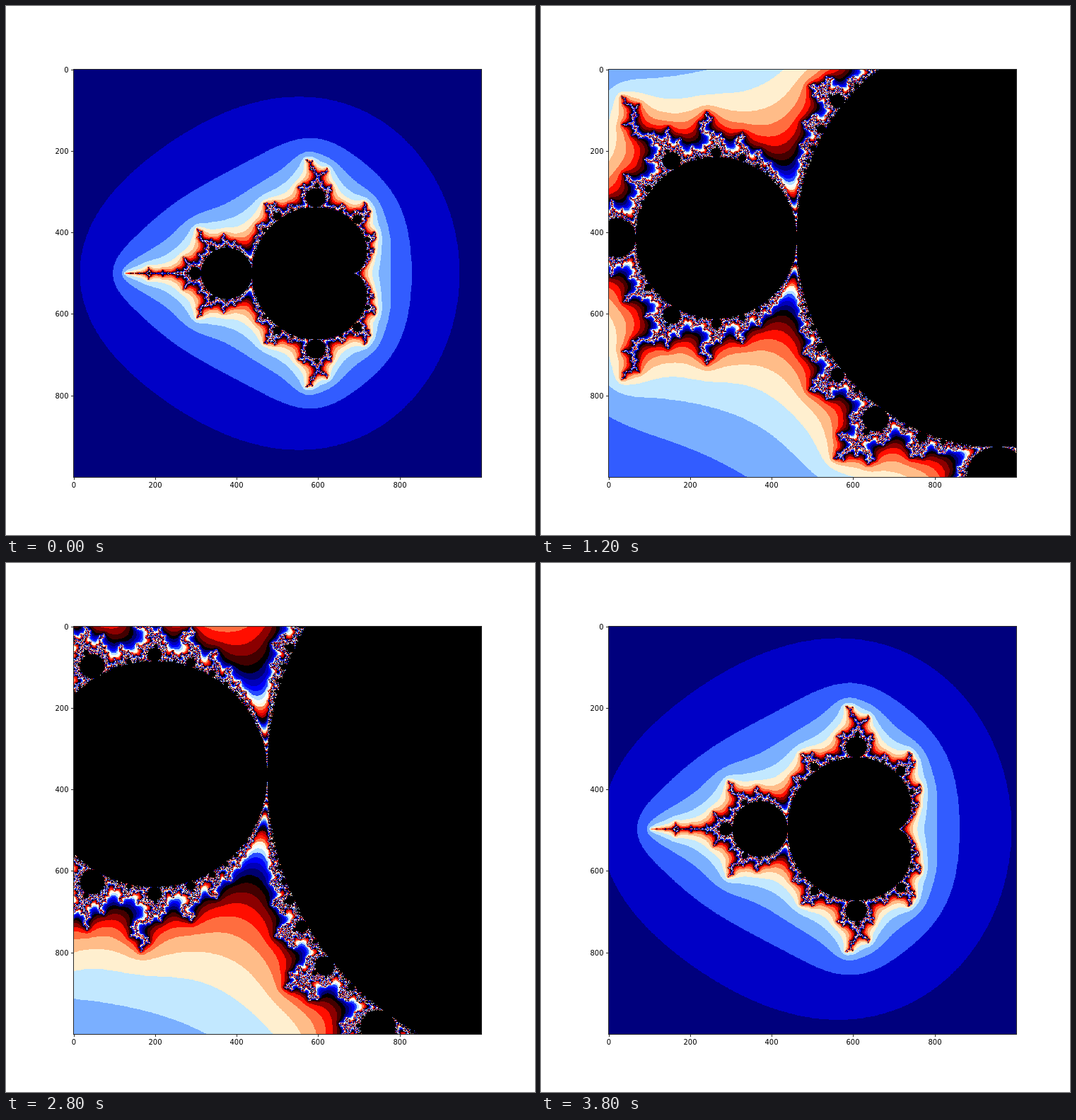
Recreate the animation shown at these times as an HTML page with a canvas. Size 748x748 px, loop 4 s.

```html
<!DOCTYPE html>
<html lang="en">
<head>
<meta charset="utf-8">
<title>Fractal zoom</title>
<style>
  html, body { margin: 0; width: 100%; height: 100%; overflow: hidden; background: #fff; }
  canvas { display: block; }
</style>
</head>
<body>
<canvas id="stage" width="748" height="748"></canvas>
<script>
const ctx = document.getElementById('stage').getContext('2d');

const LEFT = 96, TOP = 90, SIZE = 576;
const GRID = 1000, SCALE = SIZE / GRID;
const STEP = 200, FRAMES = 20, DEEPEST = 10;
const MAX_ITER = 200, BAILOUT = 100;
const TARGET = { re: -0.793191078177363, im: 0.16093721735804 };
const START = { re: -2.5, im: -2, span: 4 };

// Cyclic palette: black, blue, white, red.
const channel = v => Math.floor(255 * Math.min(1, Math.max(0, v)));

function colorAt(i) {
  const a = 31.5 * Math.PI * (255 - i) / 255;
  const r = channel(0.75 * Math.sin(a + Math.PI / 4) + 0.5);
  const g = channel(Math.sin(a));
  const b = channel(0.75 * Math.sin(a - Math.PI / 4) + 0.5);
  return [r, g, b];
}

const palette = Array.from({ length: MAX_ITER }, (_, n) =>
  colorAt(Math.min(255, Math.floor(n * 256 / (MAX_ITER - 1)))));

function insideMainBulbs(x, y) {
  const y2 = y * y, d = x - 0.25, q = d * d + y2;
  return q * (q + d) < 0.25 * y2 || (x + 1) * (x + 1) + y2 < 0.0625;
}

// Escape step, or 0 for points that stay bounded.
function escapeStep(x, y) {
  if (insideMainBulbs(x, y)) return 0;
  let a = 0, b = 0, a2 = 0, b2 = 0;
  for (let n = 0; n < MAX_ITER; n++) {
    b = 2 * a * b + y;
    a = a2 - b2 + x;
    a2 = a * a;
    b2 = b * b;
    if (a2 + b2 > BAILOUT) return n;
  }
  return 0;
}

// Plane coordinate of every screen pixel along one axis.
function axisValues(start, target, zoom) {
  const first = target + (start - target) / zoom;
  const step = START.span / zoom / (GRID - 1);
  return Float64Array.from({ length: SIZE }, (_, p) =>
    first + step * Math.floor((p + 0.5) / SCALE));
}

function render(level) {
  const zoom = 1 + level ** 3 / 100;
  const xs = axisValues(START.re, TARGET.re, zoom);
  const ys = axisValues(START.im, TARGET.im, zoom);
  const image = ctx.createImageData(SIZE, SIZE);
  const data = image.data;
  let o = 0;
  for (const y of ys) {
    for (const x of xs) {
      const c = palette[escapeStep(x, y)];
      data[o++] = c[0];
      data[o++] = c[1];
      data[o++] = c[2];
      data[o++] = 255;
    }
  }
  return image;
}

function drawAxes() {
  ctx.fillStyle = '#fff';
  ctx.fillRect(0, 0, 748, 748);

  ctx.fillStyle = 'rgb(40,40,40)';
  ctx.fillRect(LEFT - 1, TOP - 1, SIZE + 2, SIZE + 2);

  ctx.font = '10px "DejaVu Sans", sans-serif';
  ctx.textBaseline = 'alphabetic';
  for (let v = 0; v < GRID; v += 200) {
    const offset = Math.floor((v + 0.5) * SCALE);
    const x = LEFT + offset, y = TOP + offset;
    ctx.fillStyle = 'rgb(40,40,40)';
    ctx.fillRect(x, TOP + SIZE, 1, 4);
    ctx.fillRect(LEFT - 4, y, 4, 1);
    ctx.fillStyle = '#000';
    ctx.textAlign = 'center';
    ctx.fillText(v, x, TOP + SIZE + 15);
    ctx.textAlign = 'right';
    ctx.fillText(v, LEFT - 7.5, y + 4);
  }
}

const levels = Array.from({ length: DEEPEST + 1 }, (_, k) => render(k));
let shown = -1;

function draw(now) {
  const frame = Math.floor(now / STEP) % FRAMES;
  const level = frame <= DEEPEST ? frame : 2 * DEEPEST + 1 - frame;
  if (level !== shown) {
    ctx.putImageData(levels[level], LEFT, TOP);
    shown = level;
  }
}

drawAxes();
draw(0);
const begin = performance.now();
function tick() {
  draw(performance.now() - begin);
  requestAnimationFrame(tick);
}
requestAnimationFrame(tick);
</script>
</body>
</html>
```
